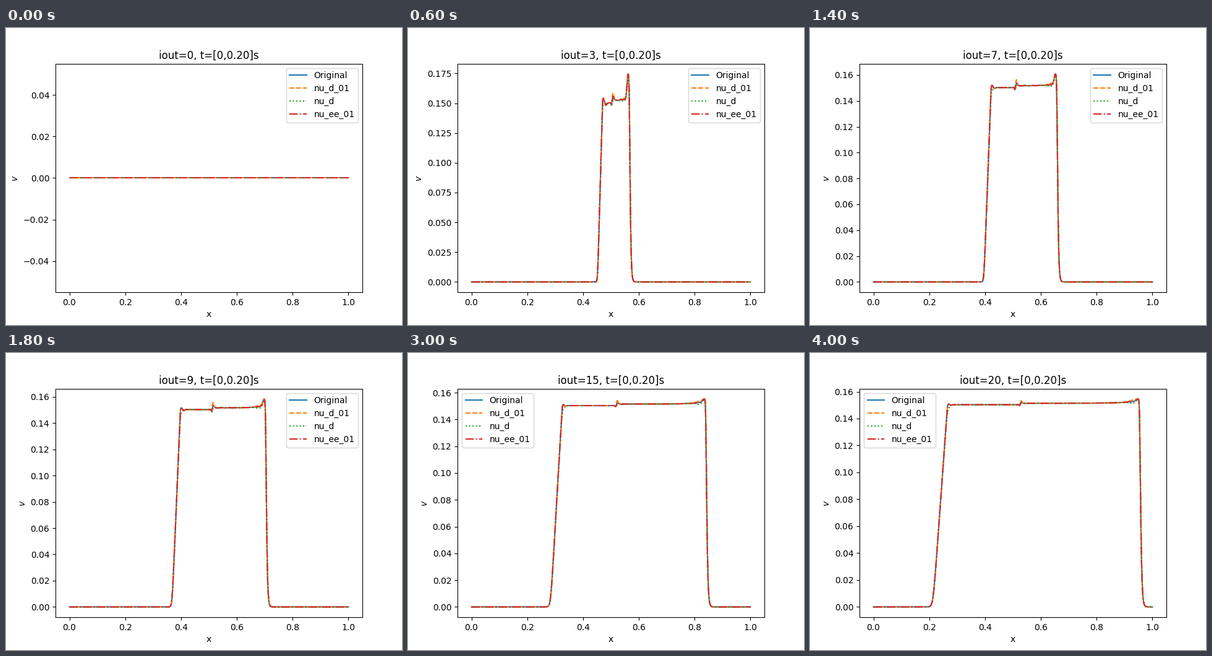
A matplotlib script for the animation above (4200 ms loop, 640 by 480 pixels).

```python
import numpy as np
import matplotlib.pyplot as plt
from matplotlib.animation import FuncAnimation

STEPS = 21
X = np.linspace(0, 1, 1001)
# label, line style, contact spike, contact dip, ripple, shoulder behind the shock
CURVES = [
    ("Original", "-", 0.35, 0.5, 1.0, 0.0),
    ("nu_d_01", "--", 1.0, 0.3, 0.3, 1.0),
    ("nu_d", ":", 0.0, 1.0, 0.6, -1.2),
    ("nu_ee_01", "-.", 0.55, 1.0, 0.2, 0.0),
]
PEAK_STEPS = [1, 2, 3, 5, 9, 12, 15, 20]
PEAKS = [0.224, 0.187, 0.1745, 0.1652, 0.1583, 0.1564, 0.1552, 0.15453]


def bump(center, width):
    return np.exp(-((X - center) / width) ** 2 / 2)


def softplus(u, s):
    return s * np.logaddexp(0, u / s)


def peak_value(k):
    """Highest velocity; the overshoot decays like 1/k between the samples."""
    return 0.1505 + np.interp(k, PEAK_STEPS, (np.array(PEAKS) - 0.1505) * PEAK_STEPS) / k


def velocity(k, spike, dip, ripple, shoulder):
    if k == 0:
        return np.zeros_like(X)
    diffusive = shoulder < 0

    # rarefaction fan: soft foot, sharp top
    mid, half = 0.5 - 0.01303 * k, 0.006 + 0.001 * k
    top = mid + half
    fan = softplus((X - mid + half) / (2 * half), 0.07)
    fan = 1 - softplus(1 - fan, 0.05 if diffusive else 0.02)

    # plateau with a contact jump
    contact = 0.5 + 0.0013 * k
    right = 0.1512 + 0.004 / k
    after = np.clip(X - contact, 0, None)
    v = 0.1503 + (right - 0.1503) / (1 + np.exp(-(X - contact) / 0.001))
    fade = np.exp(-k / 14)
    v += 0.0078 * fade * spike * bump(contact + 0.003, 0.003)
    v -= 0.0042 * fade * dip * bump(contact - 0.001, 0.0022)
    v += (0.0007 * fade * ripple * np.sin(2 * np.pi * after / 0.027)
          * np.exp(-after / 0.08))

    # overshoot at the top of the fan
    if diffusive:
        v -= 0.0016 * bump(top + 0.004, 0.006)
    else:
        v += 0.012 / k * bump(top + 0.003, 0.003)
        v -= 0.006 / k * bump(top + 0.012, 0.003)

    # shock with its ridge
    shock = 0.4995 + 0.02285 * k
    width = 0.0024 + 0.00004 * k
    offset = 0.006 + 0.00018 * k
    reach = 0.01 + 0.002 * k
    behind = np.clip(shock - X, 0, None)
    rise = 0.0022
    ridge = peak_value(k) - right - rise * np.exp(-offset / reach)
    if diffusive:
        ridge *= 0.75
    v += ridge * bump(shock - offset, 0.0035 + 0.0001 * k)
    v += rise * np.exp(-behind / reach) * (X > contact)
    v += 0.0011 * shoulder * bump(shock - offset - 0.018, 0.008 + 0.0002 * k)
    drop = 1 - np.exp(-np.exp(np.clip(-(X - shock) / width, -50, 50)))
    return np.minimum(v, peak_value(k)) * fan * drop


fig, ax = plt.subplots(figsize=(6.4, 4.8), dpi=100)


def draw(k):
    ax.clear()
    for label, style, *shape in CURVES:
        ax.plot(X, velocity(k, *shape), style, label=label)
    ax.set_xlim(-0.05, 1.05)
    if k == 0:
        ax.set_ylim(-0.055, 0.055)
    else:
        ax.set_ylim(-0.05 * peak_value(k), 1.05 * peak_value(k))
    ax.set_xlabel("x")
    ax.set_ylabel("$v$")
    ax.set_title(f"iout={k}, t=[0,0.20]s")
    ax.legend(loc="upper right" if k < 13 else "upper left")
    return ax.get_children()


anim = FuncAnimation(fig, draw, frames=STEPS, interval=200, repeat=True,
                     repeat_delay=0, init_func=lambda: draw(0))
plt.show()
```
